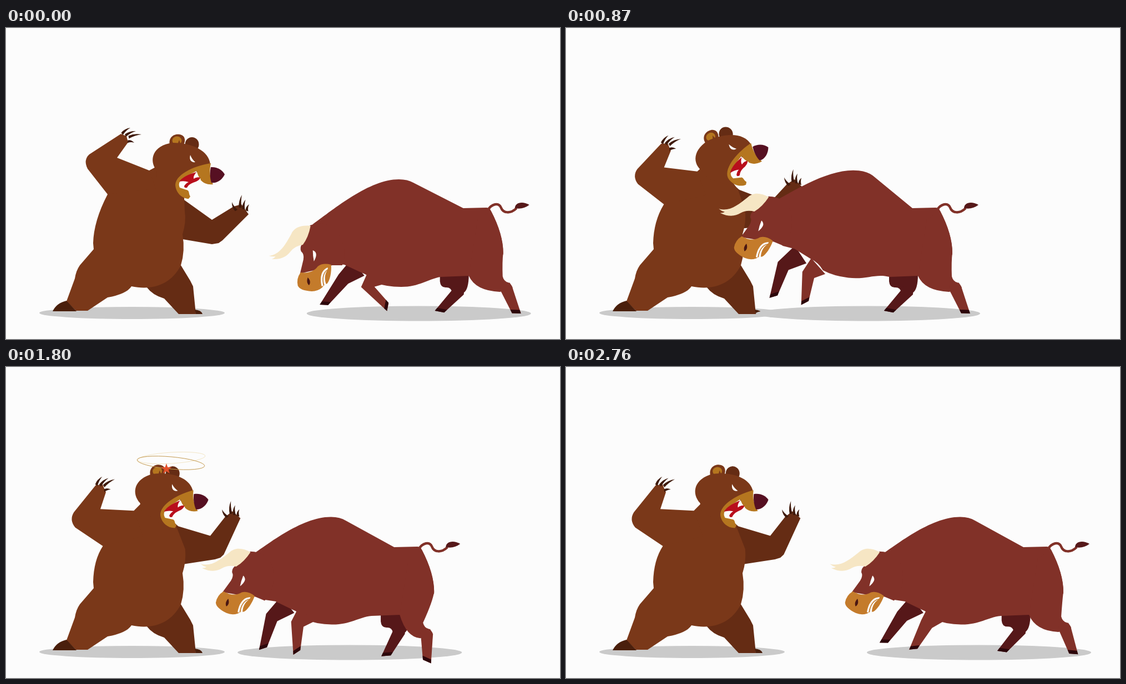
Recreate the animation shown at these times as an HTML page with a canvas. Size 998 px wide and 561 px high, loop 2.79 s.

```html
<!DOCTYPE html>
<html lang="en">
<head>
<meta charset="utf-8">
<title>Bear and bull</title>
<style>
html, body { margin: 0; width: 100%; height: 100%; overflow: hidden; background: #fcfcfc; }
canvas { display: block; width: 100%; height: 100%; }
</style>
</head>
<body>
<canvas id="stage" width="998" height="561"></canvas>
<script>
const ctx = document.getElementById('stage').getContext('2d');
const LOOP = 2790;
const RAD = Math.PI / 180;
const C = {
  paper: '#fcfcfc', shadow: '#cacaca',
  fur: '#7a3819', furDark: '#652c14', claw: '#3f1a0b', foot: '#4a1f0c',
  gold: '#b5761f', nose: '#561022', red: '#b80f1c',
  bull: '#813128', bullDark: '#561819', hoof: '#2c070b', nostril: '#4a1712',
  muzzle: '#c47b2b', horn: '#f6e6c4', star: '#e2512b'
};

// ---------- Motion ----------

const mix = (a, b, k) => a + (b - a) * k;
const linear = (t, from, to) => Math.min(1, Math.max(0, (t - from) / (to - from)));
const ramp = (t, from, to) => {
  const k = linear(t, from, to);
  return k * k * (3 - 2 * k);
};

function motionAt(t) {
  const hit = ramp(t, 400, 840);
  const settle = ramp(t, 1190, 1490);
  const toss = ramp(t, 870, 1060) - settle;
  const stepBack = ramp(t, 1490, 1800) - 0.85 * ramp(t, 1800, LOOP);
  const stride = Math.sin(Math.PI * linear(t, 0, 680)) ** 2;
  return {
    // Bear: pushed back, overshoots, springs forward
    lean: 0.6 * ramp(t, 540, 870) + 0.68 * ramp(t, 870, 1045) - 0.51 * ramp(t, 1045, 1290),
    nod: 19 * ramp(t, 900, 1500) - 25 * ramp(t, 540, 870),
    // Bull: charges, tosses its head, walks backwards
    shift: 200 * (linear(t, 1491, 2315) - linear(t, 0, 670)),
    pitch: 6.8 * hit - 5.8 * settle,
    headX: 557 - 5 * hit,
    headY: 411 - 53 * hit - 19 * toss + 29 * settle,
    headTurn: 22.5 * hit + 21 * toss,
    farFront: stride + 0.47 * (hit - settle) + 0.4 * stepBack,
    nearFront: ramp(t, 0, 800) + 0.6 * ramp(t, 1800, LOOP),
    farHind: stride + 0.35 * stepBack,
    nearHind: stride - 0.95 * stepBack
  };
}

// ---------- Drawing helpers ----------

function fill(path, color) {
  ctx.fillStyle = color;
  ctx.fill(new Path2D(path));
}

function oval(x, y, rx, ry, color) {
  ctx.beginPath();
  ctx.ellipse(x, y, rx, ry, 0, 0, Math.PI * 2);
  ctx.fillStyle = color;
  ctx.fill();
}

const poly = (points, color) => fill('M' + points.join('L') + 'Z', color);

function turned([x, y], [px, py], degrees) {
  const s = Math.sin(degrees * RAD), c = Math.cos(degrees * RAD);
  return [px + (x - px) * c - (y - py) * s, py + (x - px) * s + (y - py) * c];
}

// Runs draw with the pivot moved to x, y and turned
function posed([pivotX, pivotY], [x, y], degrees, draw) {
  ctx.save();
  ctx.translate(x, y);
  ctx.rotate(degrees * RAD);
  ctx.translate(-pivotX, -pivotY);
  draw();
  ctx.restore();
}

// ---------- Bear ----------

function claw(x0, y0, x1, y1) {
  const dx = x1 - x0, dy = y1 - y0, len = Math.hypot(dx, dy);
  const nx = dy / len, ny = -dx / len;
  const mx = x0 + dx * 0.5 + nx * 3, my = y0 + dy * 0.5 + ny * 3;
  fill(`M${x0 + nx * 2.5} ${y0 + ny * 2.5}Q${mx + nx * 2} ${my + ny * 2} ${x1} ${y1}` +
    `Q${mx - nx * 2} ${my - ny * 2} ${x0 - nx * 2.5} ${y0 - ny * 2.5}Z`, C.claw);
}

function nearClaws() {
  for (let i = 0; i < 3; i++) claw(6 * i - 5, 3 * i - 8, 10 * i + 10, 6 * i - 19);
  claw(5, 6, 17, 8);
}

function farClaws() {
  for (let i = 0; i < 3; i++) claw(6 * i - 1, 3 * i - 4, 6.5 * i + 2, 8.5 * i - 27);
  claw(-8, 1, -16, -14);
}

function bearHead() {
  oval(335, 210, 12.5, 13, C.furDark);
  fill('M295 211C292 196 304 190 313 192C324 194 324 205 319 212Z', C.fur);
  oval(308, 203, 8.5, 7.5, C.gold);
  fill('M308 213Q310 207 312 202Q313 207 316 210L316 214Z', C.fur);
  fill('M271 257C257 238 264 212 300 207C336 207 366 222 368 246L342 262L314 292L300 295L272 270Z', C.fur);
  fill('M369 244C345 247 306 262 305 283C306 298 318 308 329 308L332 304' +
    'C328 298 332 294 324 291L316 288L320 272L344 258C346 272 355 284 373 282C367 270 366 258 369 244Z', C.gold);
  fill('M313 288C309 279 315 274 322 269L343 258Q346 268 351 273L333 287Q331 295 322 291Z', C.paper);
  fill('M312 277Q320 266 343 260Q337 267 338 272Q344 268 350 270Q348 276 337 279' +
    'Q329 282 326 288Q321 289 321 285Q324 280 329 278Q321 275 312 277Z', C.red);
  fill('M369 251C380 250 390 256 394 264C390 273 380 281 370 279C367 270 367 260 369 251Z', C.nose);
  fill('M332 229C329 239 335 243 341 242Q335 237 332 229Z', C.paper);
}

function drawBear({ lean, nod }) {
  // Point between the upright and the pushed-back pose
  const at = (x0, y0, x1, y1) => [mix(x0, x1, lean), mix(y0, y1, lean)];
  const armpit = at(183, 300, 172, 330), shoulder = at(258, 257, 222, 260);

  oval(227, 514, 167, 11, C.shadow);

  poly([
    at(312, 302, 300, 274), at(318, 308, 308, 281), at(371, 346, 367, 292),
    at(410, 322, 390, 255), at(424, 318, 403, 243), at(437, 336, 418, 254),
    at(390, 383, 393, 325), at(383, 388, 387, 331), at(371, 390, 378, 334), at(318, 381, 322, 348)
  ], C.furDark);
  posed([0, 0], at(423, 328, 402, 251), -10 * lean, farClaws);

  fill('M253 467Q264 482 285 488L311 516L342 516L337 466L332 456L315 428Z', C.furDark);
  fill('M340 508Q352 509 354 516L342 516Z', C.foot);
  fill(`M${armpit}Q158 348 157 388L158 399L133 428Q126 438 124 452L109 493L126 510L147 510` +
    'L183 486Q217 480 226 466C265 474 298 462 315 428Q323 402 318 372' +
    `Q325 350 ${at(322, 330, 323, 328)}L${at(321, 306, 303, 283)}L${at(290, 240, 252, 225)}L${shoulder}Z`, C.fur);
  fill('M84 511Q91 496 109 492L127 511Z', C.foot);

  fill(`M${armpit}L${at(270, 290, 240, 310)}L${shoulder}L${at(200, 234, 161, 263)}L${at(220, 206, 168, 232)}` +
    `L${at(217, 195, 161, 217)}L${at(207, 191, 148, 220)}L${at(150, 228, 114, 272)}` +
    `Q${at(139, 238, 106, 287)} ${at(147, 254, 118, 300)}Z`, C.fur);
  posed([0, 0], at(214, 199, 157, 225), -25 * lean, nearClaws);

  posed([308, 261], at(308, 261, 270, 241), nod, bearHead);
}

function drawDizzyStar(t) {
  const start = 1330, end = 2060;
  if (t < start || t > end) return;
  ctx.save();
  ctx.globalAlpha = Math.min(1, (t - start) / 120, (end - t) / 120);
  const ring = (x, y, ry, turn, color) => {
    ctx.beginPath();
    ctx.ellipse(x, y, 61, ry, turn, 0, Math.PI * 2);
    ctx.strokeStyle = color;
    ctx.lineWidth = 1;
    ctx.stroke();
  };
  ring(298, 164, 10, -0.06, '#f3e6c6');
  ring(297, 173, 11, 0.09, '#c49a50');
  const orbit = (97 + (t - 1800) * 0.6) * RAD;
  const x = 297 + 61 * Math.cos(orbit), y = 173 + 11 * Math.sin(orbit);
  poly(Array.from({ length: 10 }, (_, i) => {
    const r = i % 2 ? 4 : 10, a = (i * 36 - 90) * RAD;
    return [x + r * Math.cos(a), y + r * Math.sin(a)];
  }), C.star);
  ctx.restore();
}

// ---------- Bull ----------

const RUMP = [826, 325], LOIN = [850, 430];

// The shin swings from its angle to the vertical while the knee drifts along
const LEGS = {
  farFront: { knee: [608, 453], drift: [-6, 7], shin: 58, angle: -37, swing: 56, cut: -34 },
  nearFront: { knee: [652, 467], drift: [0, 0], shin: 51, angle: 45, swing: -45, cut: -34 },
  farHind: { knee: [816, 473], drift: [51, 6], shin: 52, angle: -42, swing: 40, cut: -33 },
  nearHind: { knee: [902, 468], drift: [20, -14], shin: 50, angle: 21, swing: 22, cut: 24 }
};

function legPose({ knee, drift, shin, angle, swing }, k) {
  const x = knee[0] + drift[0] * k, y = knee[1] + drift[1] * k;
  const a = (angle + swing * k) * RAD;
  return [[x, y], [x + shin * Math.sin(a), y + shin * Math.cos(a)]];
}

function limb(hip, knee, foot, widths, cut, color) {
  const heading = (a, b) => Math.atan2(b[1] - a[1], b[0] - a[0]);
  const side = ([x, y], angle, w) => {
    const dx = -Math.sin(angle) * w, dy = Math.cos(angle) * w;
    return [[x + dx, y + dy], [x - dx, y - dy]];
  };
  const upper = heading(hip, knee), lower = heading(knee, foot), sole = lower + cut * RAD;
  const ankle = [foot[0] - Math.cos(lower) * 7, foot[1] - Math.sin(lower) * 7];
  const [h1, h2] = side(hip, upper, widths[0]);
  const [k1, k2] = side(knee, (upper + lower) / 2, widths[1]);
  const [a1, a2] = side(ankle, sole, widths[2] + 0.5);
  const [f1, f2] = side(foot, sole, widths[2]);
  poly([h1, k1, f1, f2, k2, h2], color);
  poly([a1, f1, f2, a2], C.hoof);
}

function frontLeg(leg, k, hip, pitch, color) {
  const [h, knee, foot] = [hip, ...legPose(leg, k)].map(p => turned(p, RUMP, pitch));
  limb(h, knee, foot, [19, 12, 7.5], leg.cut, color);
}

function farHindLeg(leg, k) {
  const [[x, y], foot] = legPose(leg, k);
  fill(`M${x - 34} 444L${x - 34} ${y - 16}Q${x - 33} ${y - 5} ${x - 24} ${y - 5}` +
    `Q${x - 14} ${y - 6} ${x - 12} ${y + 4}L${x + 8} ${y + 5}Q${x + 18} ${y} ${x + 18} 444Z`, C.bullDark);
  limb([x, y - 6], [x - 1, y + 3], foot, [10, 11, 8.5], leg.cut, C.bullDark);
}

function nearHindLeg(leg, k) {
  const [[x, y], foot] = legPose(leg, k);
  fill(`M850 345L874 330Q896 372 896 405Q894 422 ${x - 7} ${y - 20}Q${x - 5} ${y - 11} ${x + 3} ${y - 9}` +
    `Q${x + 9} ${y - 6} ${x + 11} ${y + 1}L${x - 12} ${y + 8}Q846 ${y + 6} 834 447Z`, C.bull);
  limb([x - 3, y - 6], [x, y + 3], foot, [9, 11, 8], leg.cut, C.bull);
}

// The chest and hump tilt, the hindquarters stay
function bullTorso(pitch) {
  const p = (x, y) => turned([x, y], LOIN, pitch);
  fill(`M${p(553, 354)}C${p(592, 326)} ${p(655, 273)} ${p(708, 273)}Q${p(724, 273)} ${p(734, 279)}` +
    'L824 325L866 324Q872 324 874 330Q896 372 896 408L876 442L835 447L783 449' +
    `C${p(760, 453)} ${p(745, 467)} ${p(712, 467)}Q${p(685, 467)} ${p(665, 459)}` +
    `Q${p(655, 446)} ${p(640, 441)}L${p(610, 427)}L${p(588, 424)}L${p(556, 400)}Z`, C.bull);
}

function bullTail() {
  ctx.strokeStyle = C.bull;
  ctx.lineWidth = 4.5;
  ctx.stroke(new Path2D('M868 329C875 317 888 314 892 324C896 335 910 335 920 325'));
  fill('M917 325C917 316 929 311 943 319C935 325 927 327 917 325Z', C.bullDark);
}

function bullHead() {
  fill('M548 356L534 389Q529 396 532 403Q538 408 536 418L530 443L560 436L588 428L606 428Q618 400 596 366Q575 345 548 356Z', C.bull);
  fill('M531 441C547 443 556 438 562 430Q571 423 586 427C587 440 584 455 579 461Q573 463 570 468Q562 475 551 475' +
    'C537 474 529 471 526 465Q523 452 531 441Z', C.muzzle);
  fill('M580 432C566 437 566 454 569 466L572 465C569 453 570 441 580 435Z', C.paper);
  fill('M579 437C571 444 571 456 574 464L577 462C574 454 574 445 579 437Z', C.paper);
  fill('M544 450C549 455 549 461 546 464C542 460 542 455 544 450Z', C.nostril);
  fill('M553 401Q564 405 555 421Q553 411 553 401Z', C.paper);
  fill('M549 357C532 355 519 360 514 372C504 390 494 409 474 411Q480 413 486 412Q484 415 479 417' +
    'C498 418 507 411 513 403Q521 393 535 391Q545 378 549 357Z', C.horn);
}

function drawBull(m) {
  ctx.save();
  ctx.translate(m.shift, 0);
  oval(744, 515, 202, 13.5, C.shadow);
  bullTail();
  frontLeg(LEGS.farFront, m.farFront, [634, 432], m.pitch, C.bullDark);
  farHindLeg(LEGS.farHind, m.farHind);
  bullTorso(m.pitch);
  nearHindLeg(LEGS.nearHind, m.nearHind);
  frontLeg(LEGS.nearFront, m.nearFront, [668, 449], m.pitch, C.bull);
  posed([557, 411], [m.headX, m.headY], m.headTurn, bullHead);
  ctx.restore();
}

// ---------- Loop ----------

function draw(t) {
  const motion = motionAt(t);
  ctx.fillStyle = C.paper;
  ctx.fillRect(0, 0, 998, 561);
  drawBear(motion);
  drawDizzyStar(t);
  drawBull(motion);
}

const started = performance.now();
function tick() {
  draw((performance.now() - started) % LOOP);
  requestAnimationFrame(tick);
}
tick();
</script>
</body>
</html>
```
